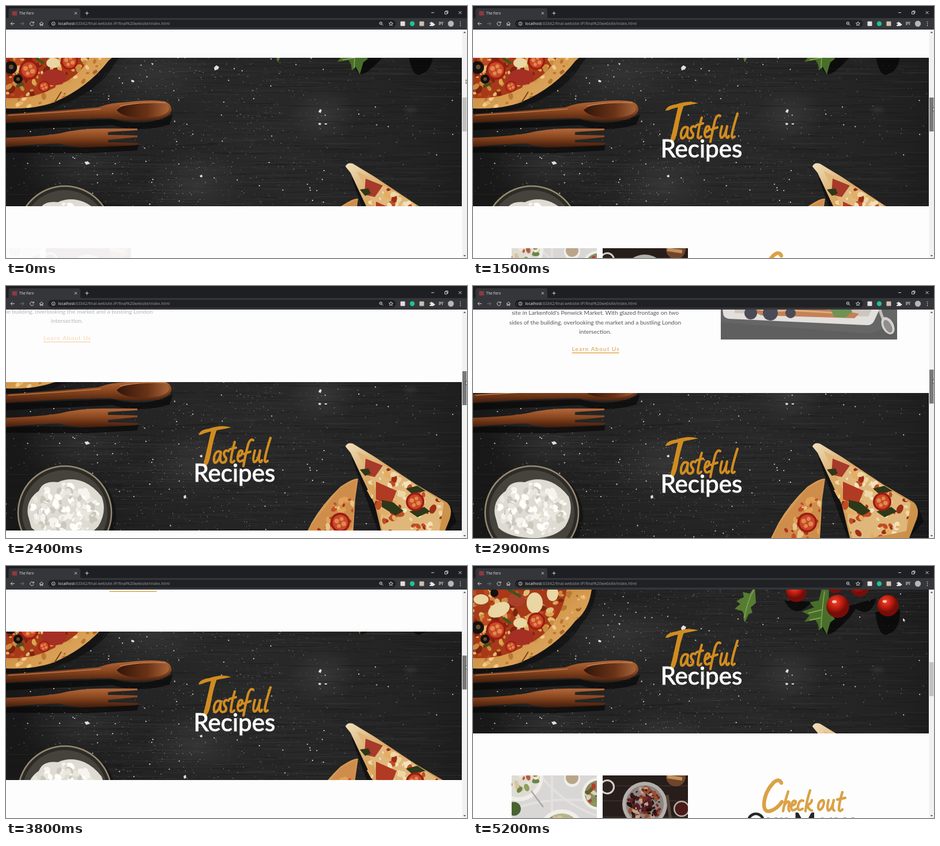
An HTML page that plays this animation: 800 px wide and 438 px high, repeating every 5.3 s.

```html
<!DOCTYPE html>
<html lang="en">
<head>
<meta charset="utf-8">
<title>The Fern</title>
<style>
html, body { margin: 0; width: 100%; height: 100%; overflow: hidden; background: #fefdfe; }
#stage { display: block; width: 100vw; height: 100vh; }
text { font-family: Lato, sans-serif; }
.ui { font-family: "Open Sans", "Noto Sans", sans-serif; }
.brush { fill: none; stroke-linecap: round; stroke-linejoin: round; }
.icon { fill: none; stroke: #dfe1e5; stroke-width: .9; }
</style>
</head>
<body>
<svg id="stage" viewBox="0 0 800 438">
<defs>
  <radialGradient id="wood" gradientUnits="userSpaceOnUse" cx="450" cy="220" r="440">
    <stop offset="0" stop-color="#2a2a2a"/><stop offset=".6" stop-color="#232323"/><stop offset="1" stop-color="#181818"/>
  </radialGradient>
  <radialGradient id="haze"><stop offset="0" stop-color="#fff" stop-opacity=".07"/><stop offset="1" stop-color="#fff" stop-opacity="0"/></radialGradient>
  <radialGradient id="red" cx=".4" cy=".3"><stop offset="0" stop-color="#ee4a30"/><stop offset=".5" stop-color="#c92112"/><stop offset="1" stop-color="#770d08"/></radialGradient>
  <linearGradient id="handle" x1="0" y1="0" x2="0" y2="1"><stop offset="0" stop-color="#b4683a"/><stop offset=".45" stop-color="#8c4820"/><stop offset="1" stop-color="#431c0b"/></linearGradient>
  <linearGradient id="scoop"><stop offset="0" stop-color="#32150a"/><stop offset=".6" stop-color="#6b3317"/><stop offset="1" stop-color="#a8653a"/></linearGradient>
  <linearGradient id="crust" x1="0" y1="0" x2="1" y2="1"><stop offset="0" stop-color="#b06c2d"/><stop offset=".55" stop-color="#d69b4f"/><stop offset="1" stop-color="#e3b671"/></linearGradient>
  <linearGradient id="wedgeCrust" x1="0" y1="0" x2="1" y2="1"><stop offset="0" stop-color="#efdfbd"/><stop offset=".3" stop-color="#d9a763"/><stop offset="1" stop-color="#c98d45"/></linearGradient>
  <clipPath id="bandClip"><rect id="band" width="791" height="258"/></clipPath>
  <clipPath id="crustClip"><path d="M0 178Q50 180 84 167Q142 142 178 95Q204 75 207 30H0Z"/></clipPath>
  <clipPath id="pizzaClip"><path d="M0 160Q44 162 76 146Q124 126 142 95Q160 70 164 30H0Z"/></clipPath>
  <clipPath id="wedgeClip"><path d="M597 282Q640 300 712 346L760 377L752 426L690 438H658L640 380L612 330Z"/></clipPath>
  <clipPath id="smallClip"><path d="M609 336L580 351L530 415L520 438H600L603 385Z"/></clipPath>
</defs>
<rect width="800" height="438" fill="#fefdfe"/>

<g clip-path="url(#bandClip)">
  <rect width="791" height="438" fill="url(#wood)"/>
  <g id="grain" fill="none" stroke-width=".8"></g>
  <ellipse cx="120" cy="275" rx="95" ry="60" fill="url(#haze)"/>
  <ellipse cx="250" cy="120" rx="120" ry="60" fill="url(#haze)"/>
  <ellipse cx="550" cy="190" rx="60" ry="50" fill="url(#haze)"/>
  <ellipse cx="702" cy="181" rx="16" ry="10" fill="url(#haze)"/>
  <ellipse cx="330" cy="310" rx="90" ry="60" fill="url(#haze)"/>
  <g id="flour" fill="none" stroke="#fff" stroke-linecap="round"></g>
  <path fill="#fff" opacity=".85" d="M361 107l4-4 5 3-2 4-6 2zM542 184l3-5 3 2-2 5zM543 203l4 1-1 3-4-1zM136 271l6-1 4 4-7 2zM553 204h4v2h-4zM336 295l4-2 1 4-3 1zM308 365l4-2 1 5-4 2zM218 128l5 2-2 3-4-2zM252 99l4 1-2 3z"/>

  <path d="M0 186Q70 186 100 170Q165 145 190 98Q212 76 214 34H0Z" fill="#0c0c0c" opacity=".6"/>
  <path d="M0 178Q50 180 84 167Q142 142 178 95Q204 75 207 30H0Z" fill="url(#crust)"/>
  <g clip-path="url(#crustClip)"><g id="bake"></g></g>
  <g clip-path="url(#pizzaClip)">
    <rect width="180" height="170" fill="#a63a18"/>
    <g id="topping"></g>
    <g fill="#e9d6a2">
      <ellipse cx="45" cy="76" rx="20" ry="12" transform="rotate(-25 45 76)"/><ellipse cx="107" cy="64" rx="14" ry="18"/>
      <ellipse cx="82" cy="99" rx="12" ry="9"/><ellipse cx="14" cy="58" rx="13" ry="9"/><ellipse cx="138" cy="48" rx="10" ry="13"/>
    </g>
    <ellipse cx="83" cy="124" rx="22" ry="14" fill="#a52f25"/><ellipse cx="75" cy="58" rx="15" ry="12" fill="#a9402b"/>
    <path d="M60 40L83 53M52 90l14 10M18 140l13-5" stroke="#41521d" stroke-width="5"/>
    <g fill="#15110f"><circle cx="8" cy="107" r="11"/><circle cx="21" cy="127" r="8"/><circle cx="37" cy="47" r="7"/></g>
    <g fill="#6b4a2d"><circle cx="9" cy="106" r="4"/><circle cx="21" cy="127" r="3"/></g>
    <g id="pizzaTomato"></g>
  </g>
  <path d="M84 168L96 149" stroke="#77421b" stroke-width="2"/>

  <path d="M0 204Q120 199 185 197Q245 212 290 188L284 206Q230 222 185 207L0 216Z" fill="#080808" opacity=".7"/>
  <path d="M0 188Q80 183 160 176Q180 168 210 167Q250 162 276 166Q288 171 287 181Q284 194 258 198Q215 202 180 195Q100 196 0 203Z" fill="url(#handle)"/>
  <path d="M192 181Q204 169 240 168Q282 164 283 179Q281 191 250 194Q204 196 192 181Z" fill="url(#scoop)"/>
  <path d="M198 174Q230 167 277 168M4 190Q90 185 165 179" fill="none" stroke="#cf8b58" stroke-width="1.2"/>
  <path d="M0 246Q80 242 130 246L230 242L228 251L140 256L0 255Z" fill="#080808" opacity=".7"/>
  <path d="M0 229Q60 227 95 221Q130 212 176 213L228 213L228 216L177 219V224L228 225L228 228L177 233V237L230 238L226 242L160 245Q120 247 92 239Q50 240 0 245Z" fill="url(#handle)"/>

  <circle cx="106" cy="400" r="85" fill="#0b0b0b" opacity=".5"/>
  <circle cx="102" cy="394" r="81" fill="#2c2b27" stroke="#968970" stroke-width="2.6"/>
  <circle cx="102" cy="394" r="74" fill="#45433b"/>
  <path d="M38 398Q34 372 57 356Q64 338 90 341Q112 331 136 341Q152 348 166 366Q176 392 160 418Q140 440 100 438Q60 436 44 420Z" fill="#dedbd2"/>
  <g id="powder"></g>

  <path d="M606 292L672 438H650L600 300ZM772 382L782 410L756 438Z" fill="#080808" opacity=".6"/>
  <path d="M589 279Q592 271 602 274L640 297L712 345L765 376Q776 386 770 405L757 438H654L640 380L598 290Z" fill="url(#wedgeCrust)"/>
  <g clip-path="url(#wedgeClip)">
    <path d="M608 286L785 360V440H650V370Z" fill="#e0b77a"/><g id="wedge"></g>
    <path d="M624 300L654 312L640 332L622 328Z" fill="#a63a2b"/><path d="M642 340l36 16-10 25-26-10z" fill="#b13a22"/>
    <path d="M614 319l15-2 4 9-10 4zM694 352l21-5 15 9-26 5zM652 372l20 4 18 15-14 8-24-15zM700 392l26-8 10 8-22 10z" fill="#2d3818"/>
  </g>
  <path d="M611 335Q604 333 580 349Q548 380 530 412L517 438H602L606 370Z" fill="#d59b57"/>
  <g clip-path="url(#smallClip)"><rect x="515" y="330" width="100" height="110" fill="#cf8d4b"/><g id="small"></g></g>
  <g id="sliceTomato"></g>

  <path d="M540 60Q560 96 588 62ZM600 84Q606 132 630 112Q656 90 664 74Q690 92 700 56ZM698 80Q704 128 722 118Q742 110 741 76Z" fill="#050505" opacity=".75"/>
  <path d="M489 36L480 48L468 45L470 54L457 61L464 66L454 74L461 77Q468 76 470 84Q468 92 472 98L478 84L485 81L482 72L491 64Z" fill="#567c33"/>
  <path d="M606 36L600 60L584 63L592 72L571 79L584 86L575 97L594 94Q600 100 600 112L607 106L614 119L620 98L628 92L622 82L626 70L617 66L618 36Z" fill="#486f2a"/>
  <path d="M488 40Q476 60 471 90M610 44Q605 80 604 108M606 76L582 82M604 90L584 94" fill="none" stroke="#93ad5e" stroke-width="1.3"/>
  <g id="cherries"></g>
</g>

<g id="page">
  <g id="about" fill="#505050" font-size="10.2" text-anchor="middle">
    <text x="220" y="-103">site in Larkenfold's Penwick Market. With glazed frontage on two</text>
    <text x="220" y="-86.5">sides of the building, overlooking the market and a bustling London</text>
    <text x="220" y="-70">intersection.</text>
    <text x="179.5" y="-40.3" text-anchor="start" font-size="9.8" letter-spacing="1.2" fill="#d6962f">Learn About Us</text>
    <rect x="179.5" y="-37.4" width="82" height="1.3" fill="#dd9a2c"/>
  </g>
  <svg id="dish" x="430" y="-140" width="306" height="80">
    <rect width="306" height="80" fill="#424242"/>
    <path d="M0 50L260 70L306 50V80H0Z" fill="#393939"/>
    <path d="M0 0H288L266 48Q262 56 252 55L14 44Q4 42 4 34Z" fill="#dcd8d4"/>
    <path d="M24 0H276L256 40L24 34Z" fill="#c3b9b1"/>
    <path d="M40 24Q90 36 130 29T240 35L232 43L70 38Z" fill="#b6642c"/>
    <path d="M48 0H225V33Q130 31 48 27Z" fill="#a85a32"/>
    <path d="M55 20L205 28M60 26L210 34" stroke="#d99b59" stroke-width="3"/>
    <g fill="#20212f"><circle cx="52" cy="34" r="11"/><circle cx="86" cy="34" r="13"/><circle cx="121" cy="34" r="9"/></g>
    <path d="M190 28l10-7 12 6 12-5 4 10-12 10-18-1z" fill="#4c7a2d"/>
    <path d="M276 28Q280 44 288 54" stroke="#b3b0ad" stroke-width="5" fill="none"/>
    <ellipse cx="290" cy="56" rx="10" ry="16" fill="#c9c6c2" transform="rotate(-28 290 56)"/>
    <ellipse cx="290" cy="57" rx="6" ry="12" fill="#77736f" transform="rotate(-28 290 57)"/>
  </svg>

  <g id="title">
    <g fill="#d18c20" stroke="#d18c20">
      <path stroke="none" d="M334 125Q336 116 352 114Q375 106 391 112Q380 114 365 117Q345 121 340 124ZM357 113L367 113Q360 130 355 160Q352 176 345 182Q341 176 345 166Q351 140 357 113Z"/>
      <path class="brush" role="img" aria-label="Tasteful" stroke-width="4.2" d="M372 154q-8-3-11 10q-1 10 3 9q6-3 9-18q-3 16 1 17M386 153q-6-3-8 4q0 4 4 8q1 8-7 8M397 137q-6 20-7 34q2 4 6-1M388 150l11-3M402 163q9-3 8-10q-5-5-8 10q0 12 9 6M429 134q-5-4-9 8q-5 20-8 37M413 158l11-4M432 152q-5 18-1 20q6-1 10-20q-4 18 0 20q2 0 3-3M459 130q-9 28-10 39q1 5 5 1"/>
    </g>
    <text x="325.500" y="206.300" font-size="42.200" fill="#fff" stroke="#fff" stroke-width="1">Recipes</text>
  </g>

  <g id="plates">
    <svg x="67" y="364" width="148" height="110">
      <rect width="148" height="110" fill="#d8d7d5"/>
      <path d="M0 60Q60 35 148 45M50 0Q90 50 148 70M70 0V110" stroke="#e2e1df" stroke-width="4" fill="none"/>
      <circle cx="12" cy="2" r="43" fill="#efedea"/><circle cx="12" cy="2" r="36" fill="#dedbd3"/><g id="saladA"></g>
      <circle cx="105" cy="6" r="14" fill="#f1eeea"/><circle cx="105" cy="4" r="11" fill="#b9a68a"/>
      <path d="M34 27L55 55" stroke="#aaa7a2" stroke-width="2.5"/>
      <circle cx="150" cy="32" r="28" fill="#efedea"/><circle cx="150" cy="32" r="23" fill="#8a8a62"/><g id="saladB"></g>
      <circle cx="87" cy="99" r="40" fill="#f1efeb"/><circle cx="87" cy="99" r="33" fill="#b7b58c"/><g id="saladC"></g>
      <circle cx="4" cy="58" r="12" fill="#4b6331"/>
    </svg>
    <svg x="225" y="364" width="148" height="110">
      <rect width="148" height="110" fill="#271d1b"/>
      <path d="M0 18H148M0 44H148M0 72H148" stroke="#382b26" stroke-width="2"/>
      <circle cx="8" cy="20" r="13" fill="#d6d1ca"/><circle cx="8" cy="20" r="10" fill="#2c2420"/>
      <circle cx="73" cy="50" r="39" fill="#b3afab"/><circle cx="73" cy="50" r="33" fill="#8b8582"/><g id="beets"></g>
      <circle cx="127" cy="2" r="17" fill="#70462a"/><path d="M112 2l26 4" stroke="#c0905c" stroke-width="6"/>
      <circle cx="137" cy="58" r="14" fill="#b8b1aa"/><circle cx="137" cy="58" r="11.5" fill="#4a1b18"/>
      <path d="M112 34l8 58" stroke="#58453a" stroke-width="5"/>
    </svg>
  </g>
  <g id="menu">
    <g class="brush" stroke="#dba145" role="img" aria-label="Check out">
      <path stroke-width="6.500" d="M535 377q-4-9-14 0q-15 16-16 37q0 14 10 12q12-3 21-16"/>
      <path stroke-width="4.400" d="M547 392q-6 18-9 34M540 416q7-10 9-5q-3 12 0 15M553 417q8-3 7-8q-5-4-8 8q0 12 9 5M573 408q-6-3-9 9q-1 11 8 5M585 390q-6 18-8 36M580 416q8-4 8-9M580 416q3 8 8 9M607 407q-8 2-8 13q2 8 8-1q4-10 0-12M617 407q-4 17 0 18q6-2 9-18q-4 16 1 18M641 393q-6 20-6 31q2 4 6-1M632 406l14-3"/>
    </g>
    <text x="474" y="460" font-size="42.200" fill="#252525" stroke="#252525" stroke-width="1">Our Menu</text>
  </g>
</g>

<rect x="791.5" y="41" width="8.5" height="397" fill="#f1f1f1"/>
<path d="M793.7 47l2.2-2.4 2.2 2.4zM793.7 433l2.2 2.4 2.2-2.4z" fill="#505050"/>
<rect id="thumb" x="792" width="7.3" height="59"/>

<rect width="800" height="22" fill="#1e1f22"/>
<path d="M2 22Q4.5 22 4.5 18V8Q4.5 4 8 4H126Q129 4 129 8V18Q129 22 132 22Z" fill="#35363a"/>
<rect y="21" width="800" height="20" fill="#35363a"/>
<rect x="73" y="24" width="604" height="13.5" rx="6.7" fill="#202124"/>
<rect x="10.5" y="9" width="8.5" height="7.5" fill="#8d3a40"/>
<text class="ui" x="23" y="15" font-size="6.2" fill="#e3e5e8">The Fern</text>
<text class="ui" x="90.5" y="33.3" font-size="6.9" fill="#989ba0"><tspan fill="#e8eaed">localhost</tspan>:63342/final-website-IP/final%20website/index.html</text>
<g class="icon">
  <path d="M119 10.5l4 4m0-4l-4 4M140.5 9.5v6m-3-3h6M738 11.5h5M785.5 9l5 5m0-5l-5 5M761.5 10h4v4h-4zM763 10V8.6h4v4h-1.4"/>
  <path d="M15 30.7H8.3m3-3l-3 3 3 3"/>
  <path stroke="#77797d" d="M24.5 30.7h6.7m-3-3l3 3-3 3"/>
  <path d="M47.5 28.8a3.2 3.2 0 1 0 .6 2.8M48.3 27v2.5h-2.5"/>
  <path d="M58 31l3.5-3.3 3.5 3.3M59.2 30.5v3.3h1.5v-2h1.6v2h1.5v-3.3"/>
  <circle cx="82.3" cy="30.7" r="2.9"/><path d="M82.3 30.3v2M82.3 28.9v.7"/>
  <circle cx="650.5" cy="30" r="2.3"/><path d="M652.3 31.8l2.2 2.2M649.4 30h2.2"/>
  <path d="M668 27.3l1 2.3 2.5.2-1.9 1.7.6 2.5-2.2-1.4-2.2 1.4.6-2.5-1.9-1.7 2.5-.2z"/>
  <path d="M751 28.2h5m-5 2h5m-5 2h3M757.2 33v-4.8h2"/>
</g>
<rect x="684.5" y="26.8" width="8" height="8" rx="1" fill="#e6dcdd"/>
<circle cx="705" cy="30.7" r="4.2" fill="#1cc495"/>
<rect x="717.5" y="26.8" width="8" height="8" rx="1" fill="#cdbfae"/>
<path d="M735 29h2a1.5 1.5 0 1 1 3 0h2v2a1.5 1.5 0 1 1 0 2.5v1.2h-7v-2a1.3 1.3 0 1 0 0-2z" fill="#e8eaed"/>
<circle cx="772" cy="30.7" r="5.2" fill="#b5b6b8"/>
<path d="M788.5 27.5v.01M788.5 30.7v.01M788.5 33.9v.01" stroke="#dfe1e5" stroke-width="1.6" stroke-linecap="round"/>
<path id="cursor" d="M0 0V7L1.6 5.6L2.7 8L3.7 7.5L2.7 5.2H4.9Z" fill="#fff" stroke="#111" stroke-width=".6"/>
</svg>
<script>
const $ = id => document.getElementById(id);
let seed = 7;
const rand = () => (seed = (seed * 16807) % 2147483647) / 2147483647;
const put = (id, markup) => { $(id).innerHTML = markup; };

function blobs(id, n, cx, cy, rx, ry, size, colors) {
  let out = '';
  for (let i = 0; i < n; i++) {
    const a = rand() * Math.PI * 2, d = Math.sqrt(rand()), r = size * (.4 + rand());
    const x = (cx + Math.cos(a) * d * rx).toFixed(1), y = (cy + Math.sin(a) * d * ry).toFixed(1);
    out += `<ellipse cx="${x}" cy="${y}" rx="${r.toFixed(1)}" ry="${(r * .65).toFixed(1)}"
      transform="rotate(${(rand() * 180).toFixed()} ${x} ${y})" fill="${colors[i % colors.length]}"/>`;
  }
  put(id, out);
}

const cherry = ([x, y, r]) => `<circle cx="${x}" cy="${y}" r="${r}" fill="url(#red)"/>
  <ellipse cx="${x - r * .3}" cy="${y - r * .4}" rx="${r * .2}" ry="${r * .13}" fill="#fff" opacity=".7"/>`;
const half = ([x, y, r]) => `<circle cx="${x}" cy="${y}" r="${r}" fill="#9c1c10"/>
  <circle cx="${x}" cy="${y}" r="${r * .78}" fill="#c9472a"/>
  <g fill="#e08a4c">${[-1, 1].map(s => `<circle cx="${x + s * r * .36}" cy="${y + s * r * .14}" r="${r * .24}"/>
  <circle cx="${x - s * r * .14}" cy="${y + s * r * .36}" r="${r * .2}"/>`).join('')}</g>`;

function drawPhoto() {
  const streaks = ['#4d4d4d', '#0b0b0b'].map(color => {
    let d = '';
    for (let i = 0; i < 380; i++) {
      const w = 15 + rand() * 110;
      d += `M${(rand() * 760).toFixed()} ${(35 + rand() * 400).toFixed(1)}q${w / 2} ${rand() * 4 - 2} ${w} ${rand() * 3 - 1.5}`;
    }
    return `<path d="${d}" stroke="${color}" opacity=".3"/>`;
  });
  put('grain', streaks.join(''));

  // Flour is densest left of the middle and thins out to the right.
  const layers = [[1000, .9, .38], [480, 1.25, .6], [120, 2.1, .8]];
  put('flour', layers.map(([n, w, o]) => {
    let d = '';
    for (let i = 0; i < n; i++) {
      const x = i % 5 ? 310 + (rand() + rand() + rand() - 1.5) * 370 : rand() * 790;
      d += `M${x.toFixed(1)} ${(38 + rand() * 400).toFixed(1)}h.1`;
    }
    return `<path d="${d}" stroke-width="${w}" opacity="${o}"/>`;
  }).join(''));

  blobs('bake', 260, 80, 85, 135, 105, 5, ['#e5b66c', '#bb7632', '#efcb8c', '#d3974b', '#a9652a']);
  blobs('topping', 260, 70, 90, 105, 80, 5.5, ['#c04a20', '#dda552', '#7d2412', '#e0bd78', '#b2361a', '#c98b3f']);
  blobs('powder', 130, 103, 388, 58, 45, 6, ['#f6f4ee', '#e9e6dd', '#fffef9', '#cbc7bc']);
  blobs('wedge', 120, 690, 375, 82, 70, 6, ['#eed7a5', '#c04c24', '#e4ad63', '#9c2f17', '#f1e2bd']);
  blobs('small', 55, 570, 395, 42, 55, 5, ['#c64f27', '#e7c487', '#a9351c', '#e1a359']);
  put('pizzaTomato', [[40, 111, 17], [110, 96, 15], [66, 140, 10]].map(half).join(''));
  put('sliceTomato', [[710, 375, 16], [580, 411, 17]].map(half).join(''));
  put('cherries', [[561, 45, 17.5], [628, 33, 14], [671, 36, 17], [633, 70, 20], [720, 69, 18.5]].map(cherry).join(''));

  const greens = ['#6d8447', '#d8c59a', '#b7603f', '#8da05d', '#ece6d4'];
  blobs('saladA', 34, 14, 6, 30, 27, 5, greens);
  blobs('saladB', 26, 146, 33, 18, 18, 4, ['#53662f', '#b83a28', '#8a9b55', '#d9d2b8']);
  blobs('saladC', 34, 87, 98, 28, 27, 5, greens);
  blobs('beets', 130, 73, 50, 28, 28, 4, ['#4a1c20', '#7b2c20', '#20120e', '#9a5030', '#5b1e2a', '#35171a', '#c9a184']);
}

const LOOP = 5300;
const scrollKeys = [[0, 57], [1700, 57], [2400, 134], [2900, 153], [3350, 153], [3800, 81], [4300, 0], [LOOP, 0]];
const clamp = x => Math.max(0, Math.min(1, x));
const smooth = x => { x = clamp(x); return x * x * (3 - 2 * x); };
const mix = (a, b, k) => a + (b - a) * k;

function track(keys, t) {
  const i = Math.max(1, keys.findIndex(k => t < k[0]));
  const [a, b] = [keys[i - 1], keys[i]];
  return mix(a[1], b[1], clamp((t - a[0]) / (b[0] - a[0])));
}

// Cubic curve (.25, .1, .25, 1)
function ease(x) {
  let lo = 0, hi = 1;
  const curve = (s, p, q) => 3 * s * (1 - s) ** 2 * p + 3 * s * s * (1 - s) * q + s ** 3;
  for (let i = 0; i < 20; i++) {
    const m = (lo + hi) / 2;
    if (curve(m, .25, .25) < x) lo = m; else hi = m;
  }
  return curve(lo, .1, 1);
}

function reveal(id, t, start, shift) {
  const p = ease(clamp((t - start) / 1000));
  $(id).setAttribute('opacity', p.toFixed(3));
  $(id).setAttribute('transform', `translate(${(shift * (1 - p)).toFixed(2)} 0)`);
}

function render(t) {
  const scroll = track(scrollKeys, t);
  const thumbY = 167.2 - scroll / 7;
  const drag = t >= 1200 && t < 4600;
  $('band').setAttribute('y', 33 + scroll);
  $('page').setAttribute('transform', `translate(0 ${scroll})`);
  $('thumb').setAttribute('y', thumbY);
  $('thumb').setAttribute('fill', drag ? '#787878' : '#c1c1c1');

  reveal('plates', t, -70, -165);
  reveal('menu', t, 0, 165);
  reveal('title', t, 100, 0);
  reveal('about', t, 2155, -190);
  reveal('dish', t, 2400, 190);

  const reach = smooth(t / 900), leave = smooth((t - 4600) / 500);
  const x = mix(798.2, 746, leave);
  const y = mix(mix(128, thumbY + 17, reach), 90, leave);
  $('cursor').setAttribute('transform', `translate(${x} ${y})`);
}

drawPhoto();
const begin = performance.now();
let last = -1;
function tick() {
  const step = Math.floor(((performance.now() - begin) % LOOP) / 100);
  if (step !== last) render(step * 100);
  last = step;
  requestAnimationFrame(tick);
}
tick();
</script>
</body>
</html>
```
